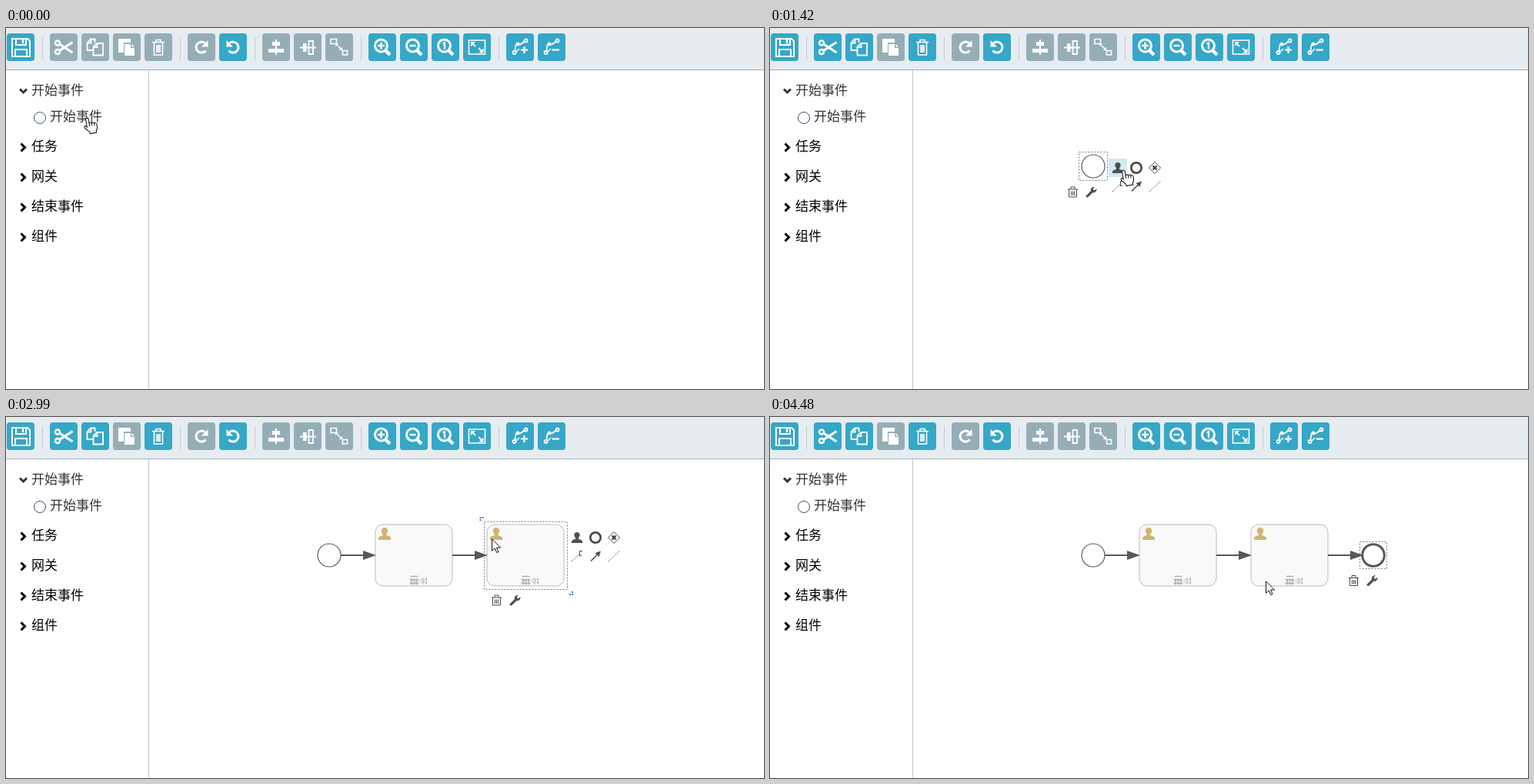
Recreate the animation shown at these times as an HTML page. Size 985 by 470 pixels, loop 4890 ms.

```html
<!DOCTYPE html>
<html lang="zh">
<head>
<meta charset="utf-8">
<title>流程设计器</title>
<style>
  html, body { margin: 0; width: 100%; height: 100%; overflow: hidden; background: #fff; }
  svg { display: block; }
  text { font: 300 17px "Noto Sans CJK SC", "Noto Sans CJK", "Noto Sans", sans-serif; fill: #000; }
  .open { fill: #333; }
  .line { fill: none; stroke: #fff; stroke-width: 2; }
  .solid { fill: #fff; stroke: none; }
  .btn { fill: #95aeb6; }
  .btn.on { fill: #36a7c7; }
  .node { fill: #fff; stroke: #585858; }
  .sel { fill: none; stroke: #777; stroke-dasharray: 2 2; }
  .dark { fill: none; stroke: #444; }
  .ink { fill: #505050; }
  .hover { fill: #cfebf2; }
  .chev { fill: none; stroke: #000; stroke-width: 3; }
  .off { visibility: hidden; }
</style>
</head>
<body>
<svg width="985" height="470" viewBox="0 0 985 470">
  <defs>
    <path id="person" d="M-7 7V4.5Q-6 2.8-2 1.8V.4Q-4-1.5-3.7-4Q-3-7 0-7Q3-7 3.7-4Q4-1.5 2 .4V1.8Q6 2.8 7 4.5V7Z"/>
    <g id="tools">
      <path class="dark" d="M-6.5-3.5H6.5M-2.5-4V-6.5H2.5V-4M-5-3V6.5H5V-3M-2 -1V4.5M0-1V4.5M2-1V4.5"/>
      <path class="ink" d="M17 5L23.5-1.5Q22.5-5 26-6.5L28.5-6.7L26-4L28-2L31-4.5Q31.3-.5 28 .8L26 .8L19.5 7Q16.500 7.500 17 5Z"/>
    </g>
    <g id="menu">
      <use href="#person" class="ink"/>
      <circle class="dark" cx="24" cy="0" r="6.7" style="stroke-width:2.600"/>
      <path class="dark" d="M48-7.500L55.500 0L48 7.500L40.500 0Z"/>
      <path class="dark" d="M45.500-2.500l5 5m0-5l-5 5" style="stroke-width:2.400"/>
      <path class="dark" d="M-7 31L3 22" stroke-dasharray="1.500 1.500"/>
      <path class="dark" d="M7 17.500H3.500V23.500H6"/>
      <path class="dark" d="M18 30.500L27 21.500" style="stroke-width:1.400"/>
      <path class="ink" d="M31 17.500L28.500 25L23.500 20Z"/>
      <path class="dark" d="M41 31L56 17" stroke-dasharray="1.500 1.500"/>
    </g>
    <g id="task">
      <rect x=".5" y=".5" width="100" height="80" rx="10" fill="#f9f9f9" stroke="#bbb"/>
      <use href="#person" transform="translate(12.500 12.500) scale(1.150)" fill="#d2b471"/>
      <path d="M46 68H56M45 72.500H57M45 77H57M47.500 71V79M51 71V79M54.500 71V79" fill="none" stroke="#b0b0b0" stroke-width="1.600"/>
      <path d="M62.500 70V78L58.500 74ZM67 70V78L63 74Z" fill="none" stroke="#b0b0b0"/>
    </g>
    <g id="taskSel">
      <rect class="sel" x="-3.500" y="-3.500" width="108" height="88"/>
      <path d="M-9.500-10h2v2h-2zm3 0h2v2h-2zm-3 3h2v2h-2zM110 87h2v2h-2zm0 3h2v2h-2zm-3 0h2v2h-2z" fill="#4a78b0"/>
      <use href="#tools" x="12.500" y="98.500"/>
    </g>
    <g id="flow">
      <path d="M0 0H30" stroke="#585858" stroke-width="2"/>
      <path d="M29-6L46 0L29 6Z" fill="#585858"/>
    </g>
  </defs>

  <rect width="985" height="54" fill="#e7ecf0"/>
  <path d="M0 54.500H985" stroke="#a3b0b8"/>
  <path d="M185.500 55V470" stroke="#c0c5c9"/>
  <path d="M47.500 12V42M226.500 12V42M323.500 12V42M461.500 12V42M640.500 12V42" stroke="#c3cbd0"/>
  <g id="bar"></g>

  <path class="chev" d="M18 79.500L22.500 84L27 79.500" style="stroke:#333"/>
  <text class="open" x="33" y="87">开始事件</text>
  <circle cx="44" cy="117" r="7.500" fill="#fff" stroke="#3f5378"/>
  <text class="open" x="57" y="121">开始事件</text>
  <g id="list"></g>

  <g data-t="882 4890"><circle class="node" cx="420" cy="180" r="15" stroke-width="1.200"/></g>
  <g data-t="882 1878">
    <rect class="sel" x="401.500" y="161.500" width="37" height="37"/>
    <use href="#tools" x="393.500" y="213.500"/>
    <rect class="hover" x="440" y="170" width="24" height="24" data-t="1335 1878"/>
    <use href="#menu" x="452" y="182"/>
  </g>

  <g data-t="1878 4890"><use href="#task" x="479.500" y="139.500"/><use href="#flow" x="435" y="180"/></g>
  <g data-t="1878 2740">
    <use href="#taskSel" x="480" y="140"/>
    <rect class="hover" x="585" y="145" width="24" height="24" data-t="1878 1950 2360 2740"/>
    <use href="#menu" x="597" y="157"/>
  </g>

  <g data-t="2740 4890"><use href="#task" x="624.500" y="139.500"/><use href="#flow" x="580" y="180"/></g>
  <g data-t="2740 3860">
    <use href="#taskSel" x="625" y="140"/>
    <rect class="hover" x="730" y="145" width="24" height="24" data-t="2740 2840 3320 3575"/>
    <rect class="hover" x="754" y="145" width="24" height="24" data-t="3575 3860"/>
    <use href="#menu" x="742" y="157"/>
  </g>

  <g data-t="3860 4890">
    <circle class="node" cx="784" cy="180" r="14.300" stroke-width="3"/>
    <use href="#flow" x="725" y="180"/>
    <rect class="sel" x="766.500" y="162.500" width="35" height="35"/>
    <use href="#tools" x="758.500" y="213"/>
  </g>

  <g id="cursor">
    <circle r="12" fill="#ff0" opacity=".5" data-t="213 882 1800 1878 2680 2740"/>
    <path data-t="356 1335 1878 2360 2740 3320 3860 4890" d="M.5.800V16.300L4.200 12.900L6.800 18.600L9 17.600L6.500 12.100H11.500Z" fill="#fff" stroke="#111"/>
    <g data-t="0 356 1335 1878 2360 2740 3320 3860" transform="rotate(-10)" fill="#fff" stroke="#111">
      <path d="M-1.800 1.500Q0-1 1.800 1.500V7Q3.500 6 5 7.500Q7 6.600 8.200 8.300Q10.300 7.700 11.300 10V14Q11 17 9.200 18.500V21H.500V19L-5 12.500Q-5.300 9.700-3.300 10.200L-1.800 12Z"/>
      <path d="M1.800 7V11.500M5 7.500V11.500M8.200 8.300V12" fill="none"/>
    </g>
  </g>
</svg>

<script>
const LOOP = 4890;
const $ = id => document.getElementById(id);
const line = (d, w = 2) => `<path class="line" d="${d}" style="stroke-width:${w}"/>`;
const solid = d => `<path class="solid" d="${d}"/>`;
const ring = (x, y, r, w = 2) => `<circle class="line" cx="${x}" cy="${y}" r="${r}" style="stroke-width:${w}"/>`;
const lens = ring(16.5, 16, 8, 3) + line("M22 22L28 28", 4.5);
const turn = line("M23.5 22.5A7 7 0 1 1 22.5 12.7", 3) + solid("M26.5 9v8.500h-8.500Z");
const bend = line("M11.5 23Q12 12 15 14T24 10", 1.8) + ring(10.5, 25, 2, 1.8) +
  ring(15, 14, 1.5, 1.8) + ring(25.5, 9.5, 2, 1.8) + line("M13 24L17 20", 1.5);

// x, enabled span, icon
const always = "0 " + LOOP, picked = "882 " + LOOP, never = "";
const buttons = [
  [1, always, line("M7 7H27L30 10V30H7ZM12 7V15H25V7M11 30V21H26V30") + line("M21 8V13", 2.5)],
  [57, picked, ring(10, 12.5, 3, 2.5) + ring(10, 24, 3, 2.5) + line("M12.500 14L29.500 25M12.500 22.500L29.500 11.500", 3.2)],
  [98, picked, line("M17.500 12V7.500H12L7.500 12V22H15M12.500 7.500V12.500H7.500M15.500 17.500L20 13H28V28.500H15.500ZM20.500 13V18H15.500", 1.8)],
  [139, never, solid("M7 7H23V12H14V25H7Z") + solid("M15 14H23V19H28V29H15ZM24.500 14L28 17.500H24.500Z") + line("M10 9.5H20", 1)],
  [180, picked, line("M10 11.500H26M15 11V8.500H21V11M12.500 12V28H23.500V12M16 15V25M18 15V25M20 15V25", 1.6)],
  [236, never, turn],
  [277, always, `<g transform="matrix(-1 0 0 1 36 0)">${turn}</g>`],
  [333, never, solid("M13 11H23V16H13ZM8 20H28V25H8Z") + line("M18 8V28")],
  [374, never, solid("M12 13H16.500V24H12Z") + line("M8 18.500H29M19.500 10H25V27H19.500Z", 1.8)],
  [415, never, line("M7 7.500H14.500V13.500H7ZM22.500 22.500H28.500V28H22.500Z", 1.6) + line("M14 14L22 22", 1.5) + solid("M13 17V13H17ZM22 17.500V22H17.500Z")],
  [471, always, lens + line("M12 16H21M16.500 11.500V20.500", 2.5)],
  [512, always, lens + line("M12.500 16H20.500", 2.5)],
  [553, always, lens + line("M14.500 13.500L17 12.300V20.500", 2.3)],
  [594, always, line("M7.500 9H28.500V27H7.500Z", 1.6) + line("M12 13L16 17M20 19L25 24", 1.8) + solid("M10 11H16L10 17ZM26.500 25.500H20.500L26.500 19.500Z")],
  [650, always, bend + line("M19 21.500H28M23.500 17V26", 2.2)],
  [691, always, bend + line("M18.500 21.500H28", 2.2)]
];
$("bar").innerHTML = buttons.map(([x, span, icon]) =>
  `<g transform="translate(${x} 7)"><rect class="btn" width="36" height="36" rx="4" data-on="${span}"/>${icon}</g>`).join("");

$("list").innerHTML = ["任务", "网关", "结束事件", "组件"].map((name, i) => {
  const y = 154 + 39 * i;
  return `<path class="chev" d="M19.500 ${y - 3.5}L24.500 ${y + 1.5}L19.500 ${y + 6.5}"/><text x="33" y="${y + 6}">${name}</text>`;
}).join("");

// The screen refreshes in bursts: first time, last time, steps
const bursts = [[0, 0, 1], [70, 570, 8], [650, 720, 2], [810, 1100, 5], [1250, 1420, 3], [1800, 2270, 7],
  [2360, 2360, 1], [2510, 2510, 1], [2680, 2740, 2], [2840, 3170, 5], [3230, 3410, 3], [3460, 3690, 3],
  [3860, 3860, 1], [4010, 4480, 7]];
const ticks = bursts.flatMap(([a, b, n]) =>
  Array.from({ length: n }, (_, i) => Math.ceil(n > 1 ? a + (b - a) * i / (n - 1) : a)));

// Cursor path: time, x, y
const path = [[0, 105, 117], [213, 58, 108], [284, 60, 110], [427, 140, 128], [570, 283, 156], [720, 407, 177],
  [810, 420, 182], [882, 420, 184], [1100, 420, 200], [1420, 459, 185], [1878, 459, 185], [2270, 575, 164],
  [2360, 596, 158], [2510, 600, 158], [2740, 600, 158], [3170, 672, 158], [3410, 749, 158], [3690, 765, 161],
  [3860, 765, 161], [4089, 930, 185], [4168, 976, 196], [4246, 940, 205], [4480, 644, 213], [LOOP, 644, 213]];

function at(t) {
  const i = path.findIndex(p => p[0] > t);
  const [a, b] = [path[i - 1], path[i]];
  const k = (t - a[0]) / (b[0] - a[0]);
  return [1, 2].map(j => Math.round(a[j] + (b[j] - a[j]) * k));
}

const spans = s => s ? s.split(" ").map(Number) : [];
const within = (s, t) => s.filter(v => v <= t).length % 2 === 1;
const parts = [...document.querySelectorAll("[data-t]")].map(el => [el, spans(el.dataset.t)]);
const lamps = [...document.querySelectorAll("[data-on]")].map(el => [el, spans(el.dataset.on)]);

function draw(now) {
  const time = (now - start) % LOOP;
  const t = ticks.filter(v => v <= time).pop() || 0;
  for (const [el, s] of parts) el.classList.toggle("off", !within(s, t));
  for (const [el, s] of lamps) el.classList.toggle("on", within(s, t));
  $("cursor").setAttribute("transform", `translate(${at(t).join(" ")})`);
}

function loop() {
  draw(performance.now());
  requestAnimationFrame(loop);
}
const start = performance.now();
loop();
</script>
</body>
</html>
```
